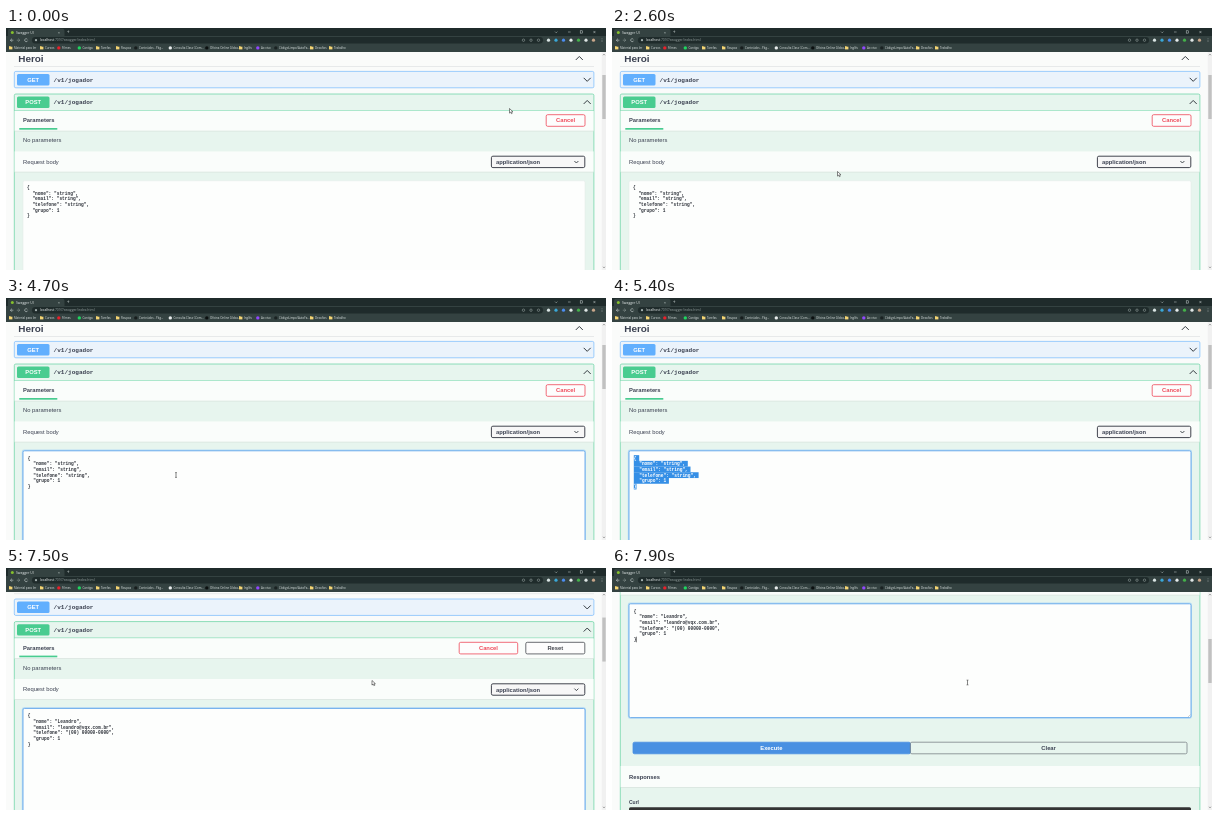
These frames come from a looping animation (600x242 px, 8000 ms). An HTML page with a canvas:

```html
<!DOCTYPE html>
<html lang="pt-BR">
<head>
<meta charset="utf-8">
<title>Swagger UI</title>
<style>
  html, body { margin: 0; width: 100%; height: 100%; overflow: hidden; background: #fafbfa; }
  canvas { display: block; width: 600px; height: 242px; }
</style>
</head>
<body>
<canvas id="stage"></canvas>
<script>
const W = 600, H = 242, LOOP = 8000, TOP = 24;
const FOCUS = 4700, SELECT = 5000, PASTE = 5800;
const SANS = '"Liberation Sans", Arial, sans-serif';
const MONO = '"Liberation Mono", monospace';
const UI = '"Open Sans", sans-serif';
const INK = '#3b4151', BLUE = '#61affe', GREEN = '#49cc90', RED = '#ee4858';
const CHAR = 2.7, LINE = 5.7;

const canvas = document.getElementById('stage');
const ctx = canvas.getContext('2d');
const ratio = window.devicePixelRatio || 1;
canvas.width = W * ratio;
canvas.height = H * ratio;

const blank = ['{', '  "nome": "string",', '  "email": "string",',
  '  "telefone": "string",', '  "grupo": 1', '}'];
const filled = ['{', '  "nome": "Leandro",', '  "email": "leandro@vqx.com.br",',
  '  "telefone": "(00) 00000-0000",', '  "grupo": 1', '}'];

// [icon x, label, icon colour]; no colour means a folder
const bookmarks = [
  [3, 'Material para ler'], [34, 'Cursos'], [51, 'Filmes', '#e8202a'],
  [71.5, 'Cantiga', '#1ed760'], [90, 'Tarefas'], [110, 'Roupas'],
  [128, 'Conteúdos - Pág...', '#171d1d'], [162.5, 'Consulta Class (.Com...', '#e8ecec'],
  [199, 'Oficina Online Globa...', '#0c1010'], [233, 'Inglês'], [250, 'Ao vivo', '#9147ff'],
  [268, 'CódigoLimpo/AutoFa...', '#1a2222'], [304, 'Desafios'], [323, 'Trabalho']
];

// [time, tip x, tip y]
const pointerPath = [
  [0, 503.5, 80.5], [300, 503.5, 80.5], [800, 310, 138], [1100, 310, 138],
  [1900, 248, 148], [2600, 225.5, 143.5], [2900, 225.5, 143.5],
  [3700, 190, 162], [3850, 170, 177], [6100, 170, 177], [6400, 283, 128.5],
  [6700, 283, 128.5], [6900, 366, 112.5], [7500, 366, 112.5], [7900, 355.5, 114.5], [8000, 355.5, 114.5]
];

const smooth = p => { p = Math.min(1, Math.max(0, p)); return p * p * (3 - 2 * p); };

function pointerAt(t) {
  const i = pointerPath.findIndex(k => k[0] > t);
  const [t0, x0, y0] = pointerPath[i - 1], [t1, x1, y1] = pointerPath[i];
  const p = smooth((t - t0) / (t1 - t0));
  return [x0 + (x1 - x0) * p, y0 + (y1 - y0) * p];
}

function rect(x, y, w, h, fill) {
  ctx.fillStyle = fill;
  ctx.fillRect(x, y, w, h);
}

function box(x, y, w, h, fill, stroke, line = 0.6, r = 1.5) {
  ctx.beginPath();
  ctx.roundRect(x, y, w, h, r);
  if (fill) { ctx.fillStyle = fill; ctx.fill(); }
  if (stroke) { ctx.strokeStyle = stroke; ctx.lineWidth = line; ctx.stroke(); }
}

function dot(x, y, r, fill) {
  ctx.fillStyle = fill;
  ctx.beginPath();
  ctx.arc(x, y, r, 0, 7);
  ctx.fill();
}

function path(points, stroke, line) {
  ctx.beginPath();
  points.forEach(([x, y]) => ctx.lineTo(x, y));
  ctx.strokeStyle = stroke;
  ctx.lineWidth = line;
  ctx.stroke();
}

// y is the middle of the capitals
function text(s, x, y, { size = 5.8, bold = true, color = INK, font = SANS, align = 'left' } = {}) {
  ctx.font = `${bold ? 'bold ' : ''}${size}px ${font}`;
  ctx.textAlign = align;
  ctx.fillStyle = color;
  ctx.fillText(s, x, y + size * 0.35);
}

function chevron(x, y, up, size = 3.5, line = 1) {
  const d = up ? -size / 4 : size / 4;
  path([[x - size, y - d * 2], [x, y + d * 2], [x + size, y - d * 2]], '#333a40', line);
}

function button(label, x, w, color) {
  box(x, 86.7, w, 11.6, '#fdfdfd', color, 0.8);
  text(label, x + w / 2, 92.4, { color, align: 'center' });
}

function operation(verb, y, color, up) {
  box(11, y + 2.6, 32.5, 11.4, color);
  text(verb, 27.2, y + 8.2, { color: '#fff', align: 'center' });
  text('/v1/jogador', 47.5, y + 8.2, { size: 6.06, font: MONO });
  chevron(581.2, y + 8.2, up);
}

function editor(t) {
  const focused = t >= FOCUS, selected = t >= SELECT && t < PASTE;
  const lines = t >= PASTE ? filled : blank;
  const x = focused ? 21.8 : 21, y = focused ? 160 : 159.3;
  if (focused) box(16.6, 152.4, 562.6, 114.6, null, 'rgba(97,175,254,.35)', 1.6);
  box(17, 152.8, 562, 113.8, '#fdfefd', focused ? '#62a6ea' : '#e3e9e6', focused ? 0.9 : 0.5);
  path([[576, 266], [578.4, 263.6]], '#888', 0.4);
  lines.forEach((s, i) => {
    const row = y + i * LINE;
    const last = i === lines.length - 1;
    if (selected) rect(x, row - LINE / 2, (s.length + (last ? 0 : 1)) * CHAR, LINE + 0.1, '#358fe6');
    text(s, x, row, { size: 4.5, font: MONO, color: selected ? '#fff' : '#30343c' });
  });
  if (t >= PASTE && (t - PASTE) % 1000 < 500)
    rect(x + CHAR, y + 5 * LINE - 2.8, 0.5, 5.6, '#111');
}

function page(t) {
  text('Heroi', 12.2, 30.6, { size: 9.95 });
  chevron(573.3, 30.2, true);
  rect(8, 38, 580, 0.5, '#d3d6d9');

  box(8.3, 43.4, 579.6, 16.4, '#ebf3fb', BLUE);
  operation('GET', 43.4, BLUE, false);

  box(8.3, 66, 579.6, 500, '#e7f5ee', GREEN);
  operation('POST', 66, GREEN, true);
  rect(8.5, 82.1, 579.2, 0.5, GREEN);

  rect(8.6, 82.8, 579, 20, '#fafdfb');
  rect(8.6, 102.8, 579, 0.6, '#d5e0da');
  text('Parameters', 17, 92.4);
  rect(13.3, 100, 38, 1.7, GREEN);
  if (t >= PASTE) {
    button('Cancel', 453.2, 58.5, RED);
    button('Reset', 519.8, 59, '#45484f');
  } else {
    button('Cancel', 540.2, 38.8, RED);
  }
  text('No parameters', 17, 112.3, { bold: false });

  rect(8.6, 123.4, 579, 20.4, '#fafdfb');
  rect(8.6, 143.8, 579, 0.6, '#d5e0da');
  text('Request body', 17, 133.8, { bold: false });
  box(485.4, 128.2, 93.4, 11.4, '#f7f7f7', '#41444e', 1);
  text('application/json', 490, 133.9);
  chevron(570.4, 134, false, 2, 0.9);

  editor(t);

  box(21, 291.2, 277.4, 11.6, '#4990e2', '#4990e2', 0.8);
  text('Execute', 159.4, 297, { color: '#fff', align: 'center' });
  box(298.4, 291.2, 276.6, 11.6, null, '#7c8388', 0.8);
  text('Clear', 436.6, 297, { align: 'center' });

  rect(8.6, 315, 579, 21, '#fafdfb');
  rect(8.6, 336, 579, 0.6, '#d5e0da');
  text('Responses', 17, 325.6);
  text('Curl', 17, 351, { size: 5 });
  box(17, 356.2, 562, 40, '#333');
}

function scrollbar(scroll) {
  rect(595.8, TOP, 4.2, H - TOP, '#f1f1f1');
  rect(596.3, 47 + scroll * 0.205, 3.4, 44, '#c1c1c1');
  path([[597, 27.3], [598, 26], [599, 27.3]], '#777', 0.6);
  path([[597, 238.7], [598, 240], [599, 238.7]], '#777', 0.6);
}

function browser() {
  const pale = '#c9d2d1', small = { size: 3.2, bold: false, color: pale, font: UI };
  rect(0, 0, W, 8.2, '#1f2b2b');
  box(2, 0.8, 56.5, 9, '#344241', null, 0, 2);
  rect(0, 8, W, TOP - 8, '#344241');
  dot(6.3, 4.4, 1.5, '#85c02c');
  text('Swagger UI', 10, 4.4, { ...small, size: 3.4, color: '#e8eeee' });
  text('×', 53, 4.2, { ...small, size: 4, align: 'center' });
  text('+', 62.3, 4.2, { ...small, size: 5, align: 'center' });

  path([[549, 3.6], [550.2, 4.8], [551.4, 3.6]], pale, 0.5);
  path([[562, 4], [564.6, 4]], pale, 0.5);
  ctx.strokeRect(574.2, 2.8, 2.3, 2.3);
  text('×', 588.5, 4, { ...small, size: 5, align: 'center' });

  path([[6, 10.6], [4.4, 12.2], [6, 13.8]], pale, 0.6);
  path([[4.4, 12.2], [7.4, 12.2]], pale, 0.6);
  path([[12.2, 10.6], [13.8, 12.2], [12.2, 13.8]], '#8b9796', 0.6);
  path([[10.8, 12.2], [13.8, 12.2]], '#8b9796', 0.6);
  ctx.beginPath();
  ctx.arc(20.2, 12.2, 1.5, 0.3, 5.6);
  ctx.strokeStyle = pale;
  ctx.stroke();

  box(26, 9, 511, 6.4, '#1f2b2b', null, 0, 3.2);
  dot(30, 12.2, 1.1, '#a7b2b1');
  const url = { ...small, size: 3.35 };
  text('localhost', 34, 12.2, { ...url, color: '#f4f8f8' });
  const host = ctx.measureText('localhost').width;
  text(':7097/swagger/index.html', 34 + host, 12.2, { ...url, color: '#94a09f' });
  [517.5, 525, 532.5].forEach(x => {
    ctx.beginPath();
    ctx.arc(x, 12.2, 1.2, 0, 7);
    ctx.strokeStyle = '#a7b2b1';
    ctx.lineWidth = 0.5;
    ctx.stroke();
  });
  ['#d9e4e3', '#39a8d8', '#4b8df0', '#e6ecec', '#44b04a', '#dfe5e5', '#c9a68a'].forEach(
    (c, i) => dot(542.5 + i * 7.5, 12.2, 1.6, c));
  [10.8, 12.2, 13.6].forEach(y => dot(596, y, 0.4, pale));

  for (const [x, label, color] of bookmarks) {
    if (color) dot(x + 1.8, 19.9, 1.7, color);
    else { rect(x, 18.2, 1.6, 1, '#e9c558'); rect(x, 18.7, 3.4, 2.7, '#f4d575'); }
    text(label, x + 5, 19.9, { ...small, size: 2.9, color: '#dde4e3' });
  }
}

function pointer(x, y, inEditor) {
  if (inEditor) {
    path([[x - 1, y - 2.4], [x + 1, y - 2.4]], '#333', 0.5);
    path([[x, y - 2.4], [x, y + 2.4]], '#333', 0.6);
    path([[x - 1, y + 2.4], [x + 1, y + 2.4]], '#333', 0.5);
    return;
  }
  ctx.beginPath();
  [[0, 0], [0, 4.6], [1.1, 3.6], [1.9, 5.2], [2.7, 4.8], [2, 3.3], [3.4, 3.2]]
    .forEach(([dx, dy]) => ctx.lineTo(x + dx, y + dy));
  ctx.closePath();
  ctx.fillStyle = '#fff';
  ctx.fill();
  ctx.strokeStyle = '#222';
  ctx.lineWidth = 0.55;
  ctx.stroke();
}

function draw(t) {
  const scroll = 117 * smooth((t - 7400) / 500);
  ctx.setTransform(ratio, 0, 0, ratio, 0, 0);
  rect(0, 0, W, H, '#fafbfa');
  ctx.save();
  ctx.translate(0, -scroll);
  page(t);
  ctx.restore();
  scrollbar(scroll);
  browser();
  if (t < SELECT || t >= 6150) {
    const [x, y] = pointerAt(t);
    pointer(x, y, y > 153 - scroll && y < 267 - scroll);
  }
}

function tick() {
  draw(performance.now() % LOOP);
  requestAnimationFrame(tick);
}
tick();
</script>
</body>
</html>
```
